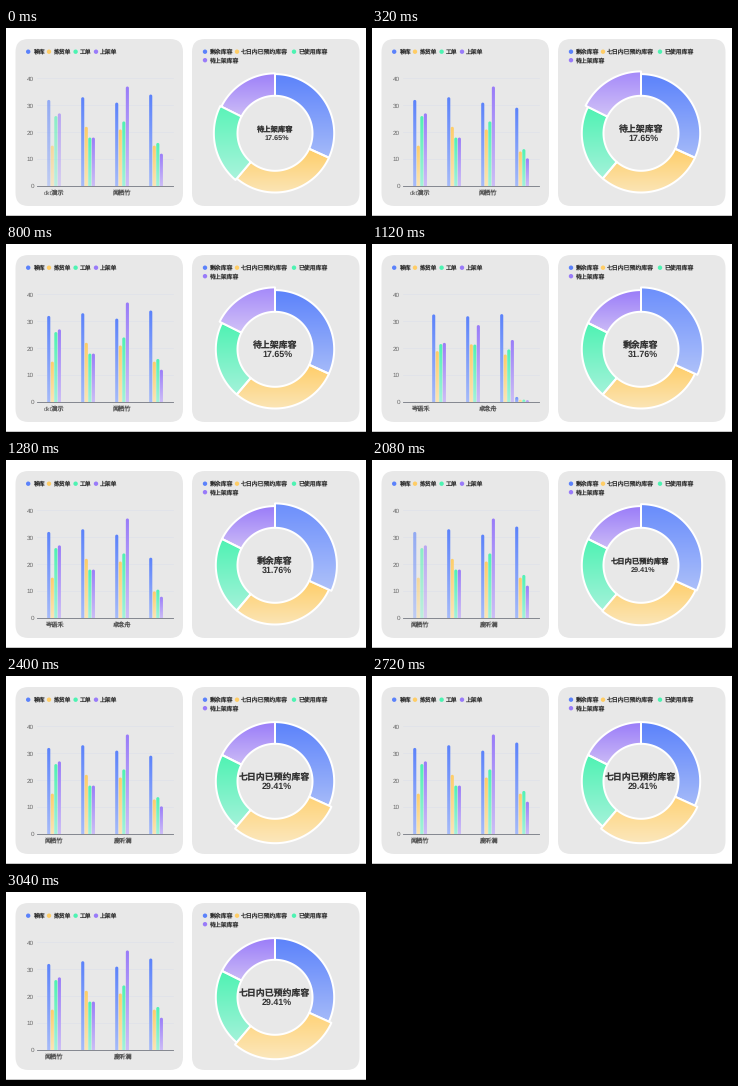
A matplotlib script that plays this animation: 360x188 px, repeating every 3.2 s.

```python
import numpy as np
import matplotlib
import matplotlib.pyplot as plt
from matplotlib.animation import FuncAnimation
from matplotlib.colors import to_rgb
from matplotlib.patches import Circle, FancyBboxPatch, Polygon

matplotlib.rcParams["font.family"] = ["Liberation Sans", "Noto Sans CJK JP"]
matplotlib.rcParams["text.hinting"] = "none"

W, H, DPI = 360, 188, 100
PX = 72 / DPI
FRAMES, INTERVAL = 20, 160
CHART_STEP = 320  # chart clock per animation step, ms

# (first step, chart clock at that step) for each carousel update
UPDATES = [(0, 30), (7, 240), (13, 30)]
ACTIVE = [3, 0, 1]

GRADIENTS = [("#5b82fb", "#a6bbf9"), ("#ffcd66", "#fbe5b6"),
             ("#4df3b2", "#a4f2da"), ("#997bf9", "#cdbdf6")]
PIE_NAMES = ["剩余库容", "七日内已预约库容", "已使用库容", "待上架库容"]
PIE_VALUES = [27, 25, 18, 15]
CATEGORIES = ["dkt演示", "岑语禾", "闻栖竹", "卓念舟", "鹿听澜"]
GROUPS = np.array([[32, 15, 26, 27], [33, 22, 18, 18],
                   [31, 21, 24, 37], [34, 15, 16, 12]], float)

BASE_Y, UNIT = 158, 2.69
BAR_X, BAR_W, BAR_PITCH, SLOT = 41.2, 3.1, 3.55, 34
CX, CY, R_IN, R_OUT, GROW = 269, 105.3, 37.5, 59.2, 2.7

fig = plt.figure(figsize=(W / DPI, H / DPI), dpi=DPI, facecolor="white")
ax = fig.add_axes([0, 0, 1, 1])
ax.set_xlim(0, W)
ax.set_ylim(H, 0)
ax.axis("off")


def cubic_in_out(p):
    p = np.clip(p, 0, 1)
    return 4 * p ** 3 if p < 0.5 else 1 - (2 - 2 * p) ** 3 / 2


def cubic_out(p):
    return 1 - (1 - np.clip(p, 0, 1)) ** 3


def label(x, y, text, size, color="#333333", ha="left", weight="normal", z=5):
    return ax.text(x, y + 0.36 * size, text, fontsize=size * PX, color=color,
                   ha=ha, va="baseline", weight=weight, zorder=z)


def gradient_shape(points, stops, alpha=1, lift=0, z=3):
    """Fill an outline with a vertical gradient."""
    top, bottom = (np.array(to_rgb(c)) for c in stops)
    mix = np.linspace(0, 1, 64)[:, None, None]
    pixels = top + (bottom - top) * mix
    pixels = pixels + (1 - pixels) * lift
    (x0, y0), (x1, y1) = points.min(axis=0) - 1, points.max(axis=0) + 1
    image = ax.imshow(np.repeat(pixels, 2, axis=1), extent=(x0, x1, y1, y0),
                      aspect="auto", interpolation="bilinear", alpha=alpha,
                      zorder=z)
    clip = Polygon(points, transform=ax.transData)
    image.set_clip_path(clip)
    return image


def bar(slot, series, value, alpha=1):
    x = BAR_X + SLOT * slot + BAR_PITCH * series
    height = value * UNIT
    r = min(BAR_W / 2, height)
    a = np.linspace(np.pi, 2 * np.pi, 13)
    cap = np.column_stack([x + BAR_W / 2 * (1 + np.cos(a)),
                           BASE_Y - height + r * (1 + np.sin(a))])
    points = np.vstack([[x, BASE_Y], cap, [x + BAR_W, BASE_Y]])
    return gradient_shape(points, GRADIENTS[series], alpha)


def sector(index, focus):
    edges = np.cumsum([0] + PIE_VALUES) / sum(PIE_VALUES) * 2 * np.pi
    a = np.linspace(edges[index], edges[index + 1], 70)
    ring = np.column_stack([np.sin(a), -np.cos(a)])
    points = np.vstack([ring * (R_OUT + GROW * focus), ring[::-1] * R_IN])
    points += [CX, CY]
    z = 3 + focus
    fill = gradient_shape(points, GRADIENTS[index], lift=0.1 * focus, z=z)
    edge = Polygon(points, closed=True, fill=False, edgecolor="white",
                   linewidth=2 * PX, joinstyle="round", zorder=z + 0.01)
    return [fill, ax.add_patch(edge)]


def legend_item(x, y, index, text, size):
    ax.add_patch(Circle((x, y), 2.2, color=GRADIENTS[index][0], lw=0))
    label(x + 4.4, y, text, size)


def draw_static():
    for x in (9.5, 186):
        ax.add_patch(FancyBboxPatch((x + 13, 24), 141.5, 141,
                                    boxstyle="round,pad=13", lw=0,
                                    facecolor="#e8e8e8", zorder=0))
    ax.plot([0, W], [186.5, 186.5], color="#c8c8c8", lw=PX)

    for value in range(0, 50, 10):
        y = BASE_Y - value * UNIT
        if value:
            ax.plot([31, 167], [y, y], color="#dde1ea", lw=0.6 * PX, zorder=1)
        label(28, y, str(value), 6.4, "#666666", "right")
    ax.plot([31, 167], [BASE_Y, BASE_Y], color="#7c7f88", lw=0.9 * PX, zorder=4)

    bar_legend = zip((22.2, 43, 69.6, 90), ("移库", "拣货单", "工单", "上架单"))
    for i, (x, text) in enumerate(bar_legend):
        legend_item(x, 23.7, i, text, 5.8)
    spots = [(199, 23.7), (231, 23.7), (288, 23.7), (199, 32.2)]
    for i, (x, y) in enumerate(spots):
        legend_item(x, y, i, PIE_NAMES[i], 5.9)


def draw_bars(clock):
    move = cubic_in_out(clock / 500)
    enter = cubic_in_out(clock / 1000)
    fade = 1 - cubic_out(clock / 200)
    made = []
    for s in range(4):
        if fade > 0:
            made.append(bar(0, s, GROUPS[0, s], fade))
        for slot in range(3):
            old, new = GROUPS[slot + 1, s], GROUPS[slot, s]
            made.append(bar(slot + 1 - move, s, old + (new - old) * move))
        if enter > 0.002:
            made.append(bar(3, s, GROUPS[3, s] * enter))
    return made


def draw_pie(active, clock):
    focus = cubic_out(clock / 300)
    levels = {active: focus, (active - 1) % 4: 1 - focus}
    made = []
    for i in range(4):
        made += sector(i, levels.get(i, 0))
    size = 6.7 + 2.2 * focus
    share = f"{PIE_VALUES[active] / sum(PIE_VALUES):.2%}"
    style = dict(ha="center", weight="bold", z=6)
    made.append(label(CX - 0.7, CY - 0.52 * size, PIE_NAMES[active], size, **style))
    made.append(label(CX + 2, CY + 0.52 * size, share, size, **style))
    return made


moving = []


def update(frame):
    while moving:
        moving.pop().remove()
    state = max(i for i, (first, _) in enumerate(UPDATES) if first <= frame)
    first, offset = UPDATES[state]
    clock = offset + (frame - first) * CHART_STEP
    moving.extend(draw_bars(clock))
    moving.extend(draw_pie(ACTIVE[state], clock))
    for slot in (0, 2):
        moving.append(label(48 + SLOT * slot, 165, CATEGORIES[state + slot],
                            6.2, "#555555", "center"))
    return moving


draw_static()
anim = FuncAnimation(fig, update, frames=FRAMES, interval=INTERVAL,
                     init_func=lambda: update(0), repeat=True, blit=False)
plt.show()
```
